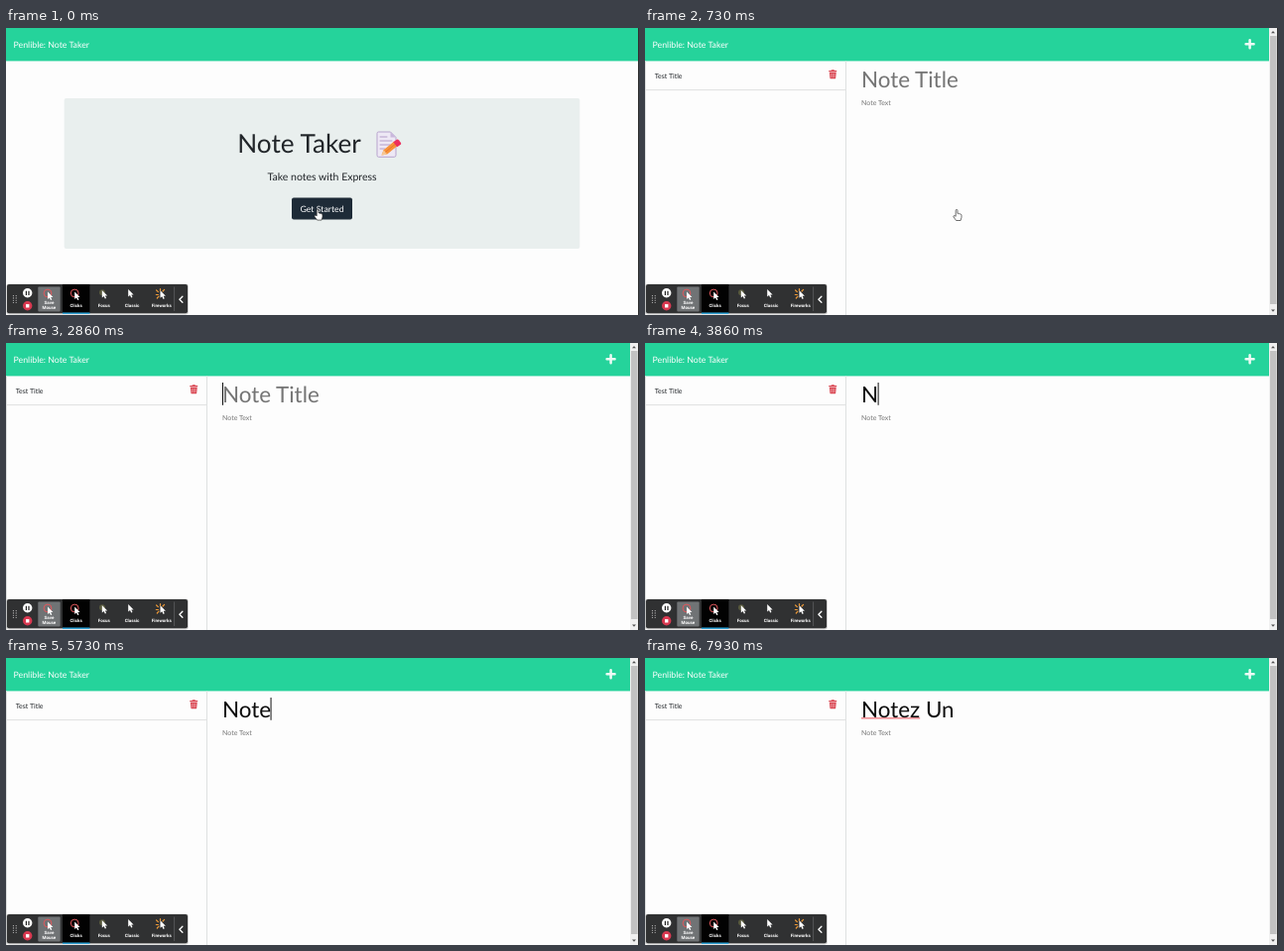
An HTML page that plays this animation: 638 by 290 pixels, repeating every 8000 ms.

```html
<!DOCTYPE html>
<html lang="en">
<head>
<meta charset="utf-8">
<title>Note Taker</title>
<style>
  html, body { margin: 0; width: 100%; height: 100%; overflow: hidden; background: #fdfdfd; }
  svg { display: block; width: 638px; height: 290px; }
  text { font-family: Lato, sans-serif; text-rendering: geometricPrecision; white-space: pre; }
  .h1 { font-size: 26.15px; }
  .title { font-size: 22.4px; }
  .lead { font-size: 10.5px; }
  .large { font-size: 8.76px; }
  .body { font-size: 7px; }
  .tool { font: 700 4.5px Roboto, sans-serif; fill: #fff; }
  .mid { text-anchor: middle; }
  .hint { fill: #757575; }
  .line { fill: none; stroke-linecap: round; stroke-linejoin: round; }
</style>
</head>
<body>
<svg viewBox="0 0 638 290">
  <defs>
    <path id="arrow" d="M0 0V7.4L1.8 5.9L3 8.6L4.3 8L3.1 5.4H5.4Z" fill="#fff"/>
    <g id="spot">
      <circle r="3.9" fill="none" stroke="#e2585c"/>
      <use href="#arrow" x="0" y="-1.5"/>
    </g>
  </defs>

  <rect width="638" height="290" fill="#fdfdfd"/>
  <rect width="637" height="33.4" fill="#25d39b"/>
  <text class="large" x="7.6" y="19.5" fill="#fff">Penlible: Note Taker</text>
  <rect x="637" width="1" height="290" fill="#303030"/>

  <g id="home">
    <rect x="58.7" y="71" width="519.6" height="152" rx="2" fill="#e9efee"/>
    <text class="h1" x="233.3" y="126.4" fill="#212529">Note Taker</text>
    <g>
      <path d="M375.5 105H387.5L393 110.5V128.5Q393 130.3 391.3 130.3H375.5Q374 130.3 374 128.5V106.6Q374 105 375.5 105Z" fill="#eee8f5" stroke="#b7a3cd"/>
      <path d="M387.5 105V110.5H393Z" fill="#c9b8dc"/>
      <path class="line" d="M377 110H384M377 114H389M377 118H387M377 122H382" stroke="#b39dc8"/>
      <path d="M378.5 128.6L380.6 123.2L391.2 114.6L394.7 118.9L384.2 127.4Z" fill="#f7923a"/>
      <path d="M380.6 123.2L384.2 127.4L378.5 128.6Z" fill="#f6c793"/>
      <path d="M382.5 125.3L393 116.8" stroke="#e9772b" fill="none"/>
      <path d="M390.3 115.3L393.8 112.8Q395 112.2 395.9 113.3L398 116Q398.6 117 397.8 117.8L394.2 120.2Z" fill="#ed2f5d"/>
    </g>
    <text class="lead mid" x="318.6" y="153.9" fill="#212529">Take notes with Express</text>
    <rect id="button" x="288" y="171.5" width="61" height="22" rx="2" fill="#1e2b37"/>
    <rect id="focus" x="287.3" y="170.8" width="62.4" height="23.4" rx="2.4" fill="none" stroke="#7e929c" stroke-width="1.6"/>
    <text class="large mid" x="318.5" y="185.5" fill="#fff">Get Started</text>
  </g>

  <g id="notes">
    <path d="M.5 33.4V290M202.5 33.4V290M0 62.6H202.5" stroke="#dfe1e1" fill="none"/>
    <text class="body" x="9.8" y="50.6" fill="#212529">Test Title</text>
    <g fill="#d9434f">
      <path d="M185.3 43H187.5L188 42.2H190.6L191.1 43H193.2V44.2H185.3Z"/>
      <path d="M185.9 44.8H192.7L192.2 50.4Q192.1 51.3 191.2 51.3H187.4Q186.5 51.3 186.4 50.4Z"/>
      <path d="M187.7 45.8V50.2M189.3 45.8V50.2M190.9 45.8V50.2" stroke="#f3c3c6" stroke-width=".6"/>
    </g>
    <path class="line" d="M605.6 16.2H613.6M609.6 12.2V20.2" stroke="#eefaf5" stroke-width="2.5"/>
    <rect x="629" width="8" height="290" fill="#f0f0f0"/>
    <rect x="630" y="8" width="6.6" height="271" fill="#c2c2c2"/>
    <path d="M631 5.2L633 3L635 5.2ZM631 284.6L633 286.8L635 284.6Z" fill="#555"/>
    <text id="placeholder" class="title hint" x="218" y="59.6">Note Title</text>
    <text id="typed" class="title" x="218" y="59.6" fill="#0c0c0c"></text>
    <path id="spelling" stroke="#ea4a55" stroke-width="1"/>
    <rect id="caret" y="40" width="1" height="22.8" fill="#111"/>
    <text class="body hint" x="218" y="78">Note Text</text>
  </g>

  <path id="hand" d="M313.2 190.3V184.6Q313.2 183.4 314.1 183.4T315 184.6V187.4Q316 187 316.6 187.8Q317.5 187.4 318 188.2Q319 188.1 319 189.2V191.3L318.1 194.5H313.6L311 190.9Q310.6 189.8 311.5 189.6Q312.2 189.5 313.2 190.3Z"
    fill="#fff" stroke="#333" stroke-width=".7"/>
  <circle id="ring" cx="314" cy="184.3" fill="none" stroke="#dc4048" stroke-width="1.7"/>

  <g id="toolbar">
    <rect x=".3" y="258.4" width="183.6" height="31" rx="3" fill="#000" opacity=".2"/>
    <rect x="1" y="259" width="182" height="29.3" rx="2" fill="#303132"/>
    <path class="line" d="M7.4 270.6V278M10.2 270.6V278" stroke="#ccc" stroke-width="1.1" stroke-dasharray="0 2.3"/>
    <circle cx="21.7" cy="267.8" r="4.7" fill="#fff"/>
    <path d="M20.4 265.7V269.9M23 265.7V269.9" stroke="#222" stroke-width="1.2"/>
    <circle cx="21.7" cy="280.8" r="4.7" fill="#d93850"/>
    <rect x="20" y="279.1" width="3.4" height="3.4" fill="#fff"/>
    <rect x="32.3" y="261.4" width="22.4" height="25" rx="1" fill="#707375"/>
    <use href="#spot" x="42" y="268"/>
    <text class="tool mid" x="43.4" y="279">Save</text>
    <text class="tool mid" x="43.4" y="283.6">Mouse</text>
    <rect x="57" y="259" width="27.4" height="29" fill="#020202"/>
    <rect x="57" y="287.5" width="27.4" height="1.4" fill="#229fd8"/>
    <use href="#spot" x="69.2" y="268"/>
    <text class="tool mid" x="70.6" y="281.6">Clicks</text>
    <circle cx="97" cy="267.3" r="3" fill="#66683f" opacity=".7"/>
    <use href="#arrow" x="96.8" y="265"/>
    <text class="tool mid" x="98.8" y="281.6">Focus</text>
    <use href="#arrow" x="123.2" y="264"/>
    <text class="tool mid" x="127" y="281.6">Classic</text>
    <path class="line" d="M151.6 265L153.4 266.6M155.5 263.6V265.2M159.6 264.4L158 266M151.3 269.5H153.4M152.3 273L154 271.2" stroke="#ee9a38" stroke-width="1.2"/>
    <use href="#arrow" x="155.5" y="265.3"/>
    <text class="tool mid" x="156.8" y="281.6">Fireworks</text>
    <path d="M169.6 261.5V286" stroke="#606162" stroke-width=".8"/>
    <path class="line" d="M177.9 271.2L174.9 274.2L177.9 277.2" stroke="#fff" stroke-width="1.3"/>
  </g>
</svg>
<script>
  const LOOP = 8000, PRESS = 460, PAGE = 730, POINTER_GONE = 1130, FOCUS = 1730, BLINK = 533;
  const TITLE = "Notez Un";
  const KEY_TIMES = [3800, 4660, 4930, 5200, 5860, 6330, 6730, 7130];
  const LEFT = 218;

  const el = id => document.getElementById(id);
  const show = (id, on) => { el(id).style.display = on ? "" : "none"; };

  function drawClick(t) {
    const pressed = t >= PRESS && t < PAGE;
    show("focus", pressed);
    show("ring", pressed);
    el("button").setAttribute("fill", pressed ? "#18232c" : "#1e2b37");
    const p = Math.min(1, Math.max(0, (t - PRESS) / 190));
    el("ring").setAttribute("r", 8 + 7.3 * (1 - (1 - p) ** 2));
    el("hand").setAttribute("transform", `translate(0 ${t < PRESS ? -0.4 : 0})`);
  }

  function drawTitle(t) {
    const count = KEY_TIMES.filter(time => time <= t).length;
    const typed = el("typed");
    typed.textContent = TITLE.slice(0, count);
    show("placeholder", count === 0);

    const blinkStart = count ? KEY_TIMES[count - 1] : FOCUS;
    show("caret", t >= FOCUS && Math.floor((t - blinkStart) / BLINK) % 2 === 0);
    el("caret").setAttribute("x", LEFT + Math.max(0, (count ? typed.getComputedTextLength() : 0) - 0.5));

    const checked = count > 5;
    show("spelling", checked);
    if (checked) {
      el("spelling").setAttribute("d", `M${LEFT} 60.9H${LEFT + typed.getSubStringLength(0, 5)}`);
    }
  }

  function draw(now) {
    const t = now % LOOP;
    show("home", t < PAGE);
    show("notes", t >= PAGE);
    show("hand", t < POINTER_GONE);
    drawClick(t);
    if (t >= PAGE) drawTitle(t);
    requestAnimationFrame(draw);
  }
  draw(0);
</script>
</body>
</html>
```
